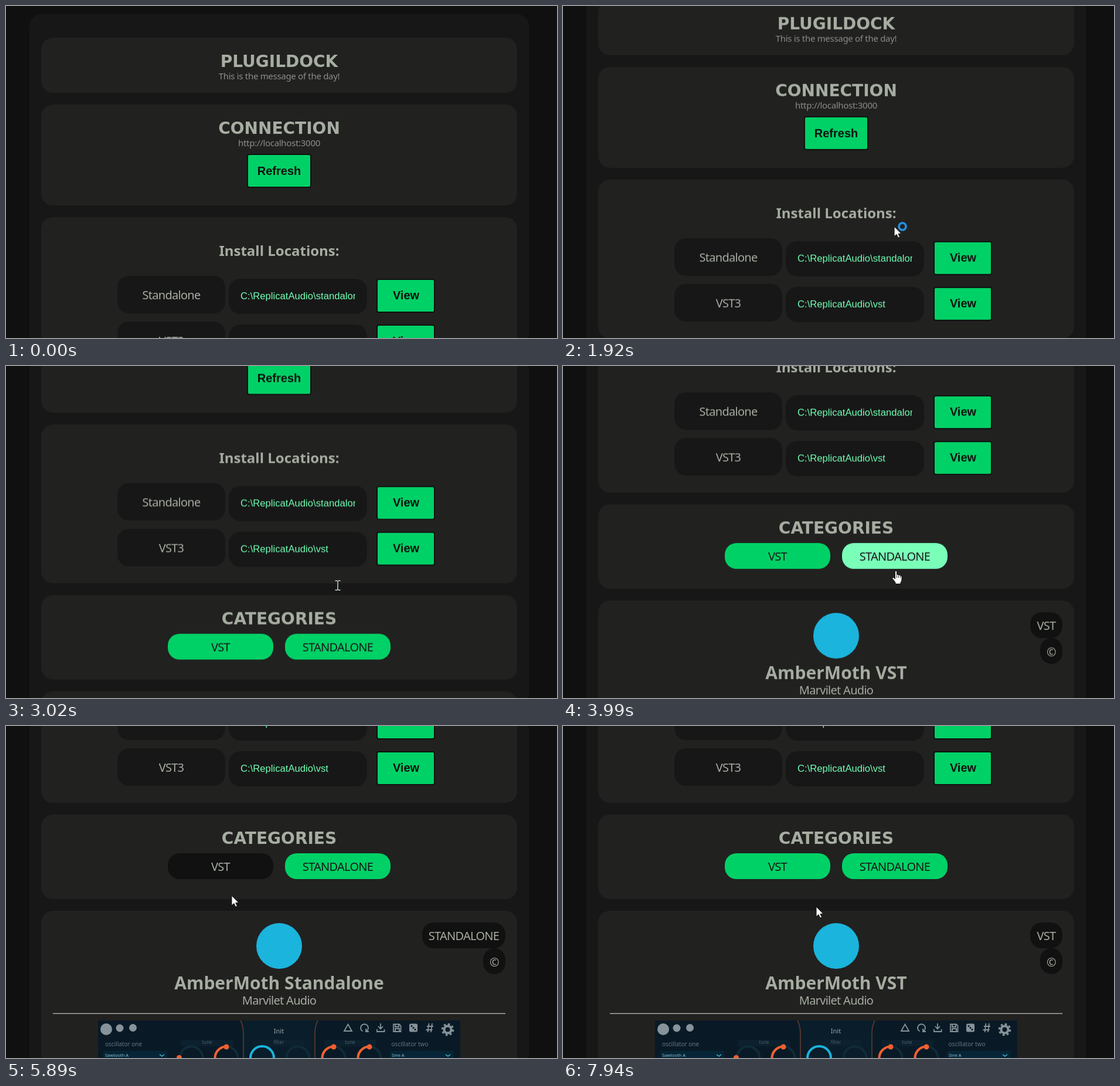
Recreate the animation shown at these times as an HTML page. Size 940 by 566 pixels, loop 8000 ms.

```html
<!DOCTYPE html>
<html lang="en">
<head>
<meta charset="utf-8">
<title>Plugin browser</title>
<style>
html, body { margin: 0; width: 100%; height: 100%; overflow: hidden; background: #101010; }
svg { display: block; width: 940px; height: 566px; }
text { font-family: "Noto Sans", "Open Sans", sans-serif; font-size: 20px; letter-spacing: -.036em; fill: #a6ada1; text-anchor: middle; }
.title { font-size: 30px; font-weight: 700; letter-spacing: 0; }
.caps { font: 700 28px "DejaVu Sans", sans-serif; letter-spacing: 0; }
.heading { font-size: 24px; font-weight: 700; letter-spacing: 0; }
.note { font-size: 15px; letter-spacing: -.02em; fill: #8b8f87; }
.path { font: 16.667px "Liberation Sans", Arial, sans-serif; letter-spacing: 0; fill: #70ffb5; text-anchor: start; }
.label { font: 700 20px "Liberation Sans", Arial, sans-serif; letter-spacing: 0; fill: #101010; }
.dark { fill: #171717; }
.card { fill: #212120; }
.tag { fill: #111; }
.button { fill: #00d166; stroke: #101010; stroke-width: 2; }
.pill { fill: #00d166; }
.small { font-size: 10px; letter-spacing: 0; fill: #63767f; }
.tiny { font-size: 7.5px; letter-spacing: 0; fill: #8fc3d4; text-anchor: start; }
.icons { fill: none; stroke: #87939a; stroke-width: 1.8; }
.track { fill: none; stroke: #102a38; stroke-width: 4; }
.arc { fill: none; stroke: #f1602f; stroke-width: 4; }
.dot { fill: #f1602f; }
.pointer { fill: #fff; stroke: #111; stroke-width: 1; stroke-linejoin: round; }

.page, .cursor, .step, .vst { animation: 8s ease-in-out infinite; }
.step { animation-timing-function: step-end; }
.vst { animation-timing-function: linear; }
.page { animation-name: scroll; }
.cursor { animation-name: move; }
.busy { animation-name: busy; }
.beam { animation-name: beam; }
.hand { animation-name: hand; }
.arrow { animation-name: arrow; }
.vst { animation-name: vst; }
.vst-text { animation-name: vst-text; }
.alone { animation-name: alone; }
.item-a { animation-name: item-a; }
.item-b { animation-name: item-b; }

@keyframes scroll {
  0%, 20.38% { transform: translateY(0); }
  26.6%, 27% { transform: translateY(-100px); }
  34.47% { transform: translateY(-200px); }
  43.1%, 48.2% { transform: translateY(-400px); }
  54.43%, 100% { transform: translateY(-500px); }
}
@keyframes move {
  0%, 5.75% { transform: translate(868px, 528px); }
  15.5%, 17.1% { transform: translate(572px, 352px); }
  20% { transform: translate(565px, 376px); }
  40.3% { transform: translate(566px, 374px); }
  43.1%, 53.5% { transform: translate(568px, 349px); }
  57.7% { transform: translate(382px, 235px); }
  71.8% { transform: translate(382px, 235px); animation-timing-function: ease-in; }
  73.6% { transform: translate(385px, 288px); animation-timing-function: ease-out; }
  77%, 81.3% { transform: translate(379px, 345px); }
  88.4%, 94.5% { transform: translate(381px, 235px); }
  99.2%, 100% { transform: translate(432px, 308px); }
}
@keyframes busy { 0%, 26.6%, 100% { opacity: 0; } 5.75% { opacity: 1; } }
@keyframes beam { 0%, 42.9%, 100% { opacity: 0; } 26.6% { opacity: 1; } }
@keyframes hand {
  0%, 54.3%, 72.8%, 96.4%, 100% { opacity: 0; }
  42.9%, 56.4%, 86.1% { opacity: 1; }
}
@keyframes arrow {
  0%, 56.4%, 86.1% { opacity: 0; }
  54.3%, 72.8%, 96.4%, 100% { opacity: 1; }
}
@keyframes vst {
  0%, 56.3% { fill: #00d166; }
  56.8%, 66.1% { fill: #7affb9; }
  68.5%, 94.1% { fill: #111; }
  95.6%, 96.4% { fill: #7affb9; }
  98%, 100% { fill: #00d166; }
}
@keyframes vst-text {
  0%, 94.1%, 100% { fill: #171717; }
  66.1%, 86.1% { fill: #7affb9; }
  72.8% { fill: #a6ada1; }
}
@keyframes alone { 0%, 54.3%, 100% { fill: #00d166; } 42.9% { fill: #7affb9; } }
@keyframes item-a { 0%, 94.1%, 100% { opacity: 1; } 66.1% { opacity: 0; } }
@keyframes item-b { 0%, 94.1%, 100% { opacity: 0; } 66.1% { opacity: 1; } }
</style>
</head>
<body>
<svg viewBox="0 0 940 566">
  <defs>
    <clipPath id="field"><rect x="400" y="465" width="196" height="60"/></clipPath>
    <clipPath id="panel"><rect x="157" y="502" width="618" height="300"/></clipPath>
    <g id="row">
      <rect class="dark" x="190" y="460" width="184" height="64" rx="20"/>
      <rect class="dark" x="380" y="465" width="236" height="60" rx="20"/>
      <rect class="button" x="633" y="466" width="98" height="56" rx="3"/>
      <text class="label" x="682.5" y="500">View</text>
    </g>
    <g id="knob">
      <circle class="track" r="19.5"/>
      <path class="arc" d="M-19.5 8V0A19.5 19.5 0 0 1 0-19.5"/>
      <circle class="dot" cy="-19" r="4.5"/>
    </g>
    <path id="tip" class="pointer" d="M0 0V17L4 13.4L6.7 19.3L9.5 18L6.8 12.3H12Z"/>
    <path id="bar" d="M-4.5-8H-1.5L0-7L1.5-8H4.5M0-7V7M-4.5 8H-1.5L0 7L1.5 8H4.5"/>
  </defs>

  <g class="page">
    <rect class="dark" x="40" y="14" width="852" height="1500" rx="20"/>

    <rect class="card" x="60" y="54" width="812" height="94" rx="20"/>
    <text class="caps" x="466" y="104">PLUGILDOCK</text>
    <text class="note" x="466" y="125">This is the message of the day!</text>

    <rect class="card" x="60" y="168" width="812" height="172" rx="20"/>
    <text class="caps" x="466" y="218">CONNECTION</text>
    <text class="note" x="466" y="239">http://localhost:3000</text>
    <rect class="button" x="412" y="253" width="108" height="56" rx="3"/>
    <text class="label" x="466" y="288">Refresh</text>

    <rect class="card" x="60" y="360" width="812" height="271" rx="20"/>
    <text class="heading" x="466" y="426">Install Locations:</text>
    <use href="#row"/>
    <text x="282" y="500">Standalone</text>
    <text class="path" x="400" y="500" clip-path="url(#field)">C:\ReplicatAudio\standalone</text>
    <use href="#row" y="78"/>
    <text x="282" y="578">VST3</text>
    <text class="path" x="400" y="578">C:\ReplicatAudio\vst</text>

    <rect class="card" x="60" y="651" width="812" height="144" rx="20"/>
    <text class="caps" x="466" y="701">CATEGORIES</text>
    <rect class="pill vst" x="276" y="717" width="180" height="44" rx="20"/>
    <text class="step vst-text" x="366" y="747">VST</text>
    <rect class="pill step alone" x="476" y="717" width="180" height="44" rx="20"/>
    <text style="fill:#171717" x="566" y="747">STANDALONE</text>

    <g transform="translate(0 500)">
      <rect class="card" x="60" y="315" width="812" height="600" rx="20"/>
      <circle cx="466" cy="375" r="39" fill="#1bb4dc"/>
      <g class="step item-a">
        <text class="title" x="466" y="449">AmberMoth VST</text>
        <rect class="tag" x="797" y="335" width="55" height="44" rx="20"/>
        <text x="824.5" y="365">VST</text>
      </g>
      <g class="step item-b" opacity="0">
        <text class="title" x="466" y="449">AmberMoth Standalone</text>
        <rect class="tag" x="710" y="335" width="142" height="44" rx="20"/>
        <text x="781" y="365">STANDALONE</text>
      </g>
      <rect class="tag" x="814" y="379" width="38" height="44" rx="19"/>
      <text x="833" y="410">©</text>
      <text x="466" y="475">Marvilet Audio</text>
      <rect x="80" y="489.5" width="772" height="1.5" fill="#a3aa9e"/>

      <g clip-path="url(#panel)">
        <rect x="157" y="502" width="618" height="300" fill="#091a26"/>
        <path d="M400 502Q405 512 405 524V810H527V524Q527 512 532 502" fill="#0a1d2a" stroke="#633a30" stroke-width="1.6"/>
        <path d="M299 535h88v11h-88zM421 535h88v11h-88zM543 535h88v11h-88z" fill="#0c202d"/>
        <path d="M166 554h109v16H166zM655 554h109v16H655z" fill="#062536"/>
        <g fill="#87939a">
          <circle cx="171" cy="517" r="10"/>
          <circle cx="194" cy="515" r="6.5"/>
          <circle cx="216.5" cy="514.5" r="6.5"/>
        </g>
        <g class="icons">
          <path d="M577 520L583.5 508.5L590 520Z"/>
          <path d="M608.5 520.5A6.5 6.5 0 1 1 614.5 520.5M614 516v5h5"/>
          <path d="M639 507v9M635 512l4 4.5l4-4.5M633 517v4h12.5v-4"/>
          <path d="M661 508.5h10l2.5 2.5v10H661ZM664 509v4h6v-4M664 521v-5h7v5"/>
          <path d="M718 512h11M716.5 518h11M721.5 507l-2 15M727 507l-2 15"/>
          <circle cx="753.5" cy="517.5" r="6" stroke-width="4"/>
          <circle cx="753.5" cy="517.5" r="9.3" stroke-width="3" stroke-dasharray="3.65"/>
        </g>
        <rect x="688" y="507.5" width="14" height="14" rx="2.5" fill="#87939a"/>
        <g fill="#091a26">
          <circle cx="692" cy="511.5" r="1.6"/>
          <circle cx="695" cy="514.5" r="1.6"/>
          <circle cx="698" cy="517.5" r="1.6"/>
        </g>
        <text class="small" x="465.5" y="524" style="font-size:11px;fill:#9aa7ad">Init</text>
        <text class="small" x="200.5" y="546">oscillator one</text>
        <text class="small" x="689" y="546">oscillator two</text>
        <g opacity=".75">
          <text class="small" x="343" y="542" style="font-size:8px">tune</text>
          <text class="small" x="465.5" y="542" style="font-size:8px">filter</text>
          <text class="small" x="587" y="542" style="font-size:8px">tune</text>
        </g>
        <text class="tiny" x="169" y="564">Sawtooth A</text>
        <text class="tiny" x="658" y="564">Sine A</text>
        <path d="M262 560l4 3l4-3M750 560l4 3l4-3" fill="none" stroke="#49b5d3" stroke-width="1.5"/>
        <circle class="track" cx="316" cy="566" r="19.5"/>
        <circle class="dot" cx="295.5" cy="565.5" r="4.5"/>
        <use href="#knob" x="376" y="566"/>
        <circle class="track" cx="437" cy="566" r="20" style="stroke:#1bb4dc"/>
        <circle class="track" cx="498" cy="566" r="19.5"/>
        <use href="#knob" x="559" y="566"/>
        <use href="#knob" x="620" y="566"/>
      </g>
    </g>
  </g>

  <g class="cursor">
    <g class="step busy" opacity="0">
      <use href="#tip"/>
      <circle cx="14" cy="0" r="6" fill="none" stroke="#2196e8" stroke-width="3.5"/>
    </g>
    <g class="step beam" opacity="0" fill="none">
      <use href="#bar" stroke="#111" stroke-width="3"/>
      <use href="#bar" stroke="#d5e5db" stroke-width="1.4"/>
    </g>
    <g class="step hand" opacity="0">
      <path class="pointer" d="M-1.5 1.5Q0-1 1.5 1.5V7Q3.5 5.5 4.5 7.5Q6.5 6.5 7.5 8.5Q10 8 10 10.5V15Q10 18 8 20V22.5H-1V20L-6 13.5Q-6.5 10.5-4 11.5L-1.5 14Z"/>
      <path d="M1.5 7.5V12M4.5 8V12M7.5 9V12" fill="none" stroke="#111" stroke-width=".9"/>
    </g>
    <use class="step arrow" href="#tip" opacity="0"/>
  </g>
</svg>
</body>
</html>
```
